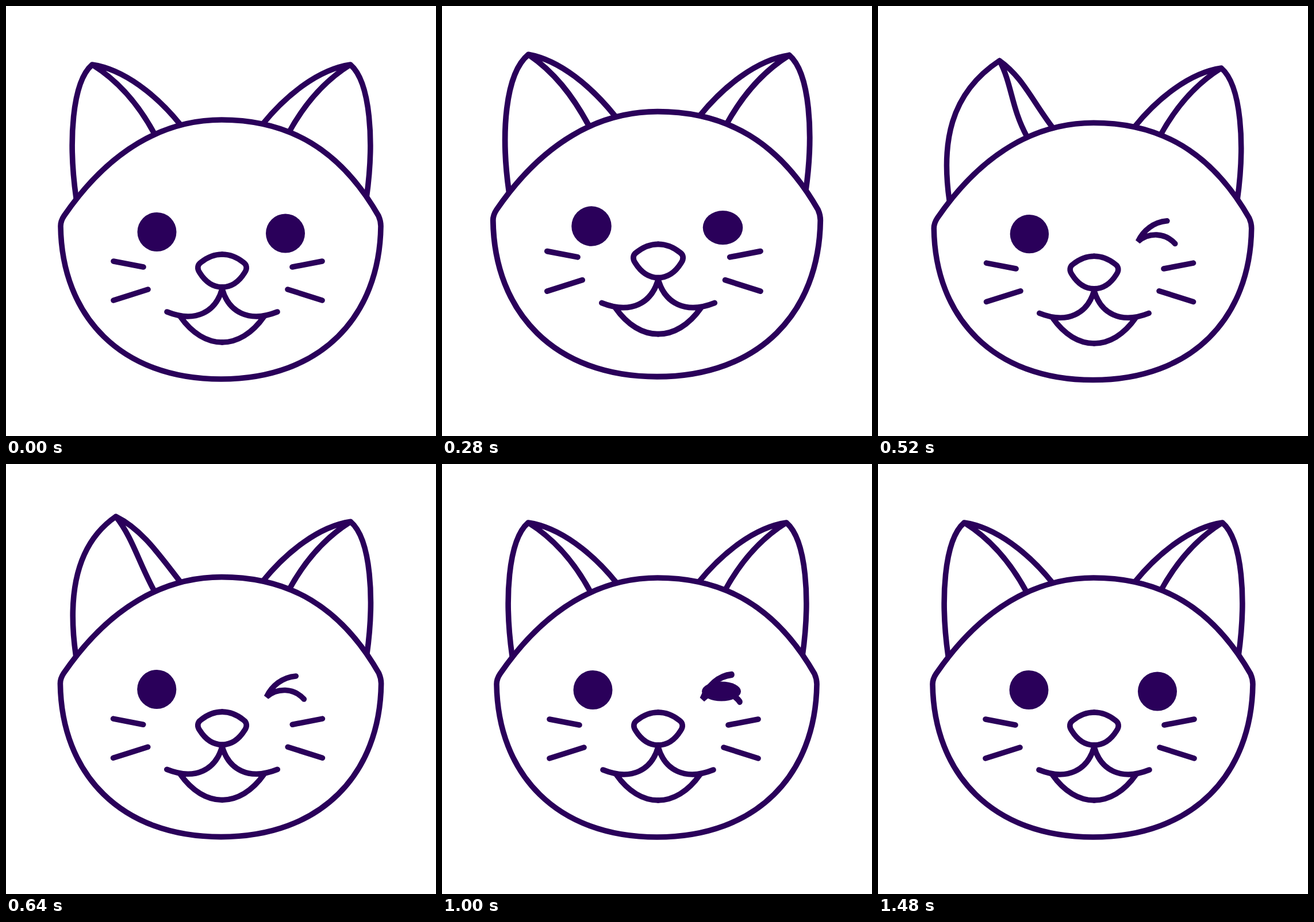
Write an HTML page that moves like this. It is 748 px wide and 748 px high and loops after 1.6 s.

```html
<!DOCTYPE html>
<html lang="en">
<head>
<meta charset="utf-8">
<title>Winking cat</title>
<style>
  html, body { margin: 0; height: 100%; overflow: hidden; background: #fff; }
  svg { display: block; width: 100%; height: 100%; }
  .line { fill: none; stroke: #2a005a; stroke-width: 9.6; stroke-linecap: round; stroke-linejoin: round; }
  .eye { fill: #2a005a; }
  #face { fill: #fff; }
  #wink { stroke-linejoin: bevel; }
</style>
</head>
<body>
<svg viewBox="0 0 748 748">
  <g id="head">
    <path class="line" id="leftEar"/>
    <path class="line" id="rightEar" transform="matrix(-1 0 0 1 749 0)"/>
    <path class="line" id="face" d="M95 383Q95 374 101 365C180 250 275 198 375 198C493 198 582 250 648 365Q652 374 652 383C650 540 548 649 374 649C200 649 97 540 95 383Z"/>
    <circle class="eye" cx="262.5" cy="393" r="34"/>
    <ellipse class="eye" id="rightEye" cx="486" cy="395.5" rx="34"/>
    <path class="line" id="wink" d="M504 370C480 372 462 387 453 406C472 390 500 390 518 410"/>
    <g class="line" id="muzzle">
      <g id="half">
        <path d="M376 432C361 432 349 438 339 446C333 450 332 457 337 464C347 480 360 489 376 489"/>
        <path d="M280 532C330 552 365 532 376 492M303 540C324 570 350 585 376 585"/>
      </g>
      <use href="#half" transform="matrix(-1 0 0 1 752 0)"/>
      <path id="whiskers" d="M187 444L239 454M187 512L247 493"/>
      <use href="#whiskers" transform="matrix(-1 0 0 1 737 0)"/>
    </g>
  </g>
</svg>
<script>
const LOOP = 1600, STEP = 40;
const [head, leftEar, rightEar, rightEye, wink, muzzle] =
  ["head", "leftEar", "rightEar", "rightEye", "wink", "muzzle"].map(id => document.getElementById(id));

// Sine-eased rise from 0 to 1 between two times.
function ramp(t, from, to) {
  const x = Math.min(1, Math.max(0, (t - from) / (to - from)));
  return (1 - Math.cos(Math.PI * x)) / 2;
}

// A turn of 1 pulls the tip inwards and the nearby handles with it.
function earPath(turn) {
  const near = (x, y, dx, dy) => `${x + dx * turn} ${y + dy * turn} `;
  const tip = near(150, 102, 60, -13);
  return `M122 334C108 235 ${near(115, 132, 7, 15)}${tip}` +
    `C${near(205, 110, 45, 7)}${near(262, 155, 6, 5)}303 206` +
    `M${tip}C${near(195, 130, 37, 0)}230 170 258 222`;
}

function draw(t) {
  const bounce = 1.08 * ramp(t, 0, 250) - 1.53 * ramp(t, 250, 480)
    + .55 * ramp(t, 480, 640) - .16 * ramp(t, 640, 760) + .06 * ramp(t, 760, 880);
  const lift = ramp(t, 0, 260) - ramp(t, 260, 540);
  const turn = ramp(t, 240, 450) - ramp(t, 580, 740);
  const open = 1 - ramp(t, 240, 400) + ramp(t, 920, 1080);

  head.setAttribute("transform",
    `translate(373.5 ${649 - 4.2 * bounce}) scale(${1 + .022 * bounce}) translate(-373.5 -649)`);
  muzzle.setAttribute("transform", `translate(0 ${-8.5 * lift})`);
  leftEar.setAttribute("d", earPath(turn));
  rightEye.setAttribute("ry", 34 * open);
  wink.setAttribute("visibility", open < .6 ? "visible" : "hidden");
  wink.setAttribute("transform", `translate(0 390) scale(1 ${1 + .36 * open}) translate(0 -390)`);
}

function tick() {
  draw(Math.floor(performance.now() % LOOP / STEP) * STEP);
  requestAnimationFrame(tick);
}
rightEar.setAttribute("d", earPath(0));
tick();
</script>
</body>
</html>
```
